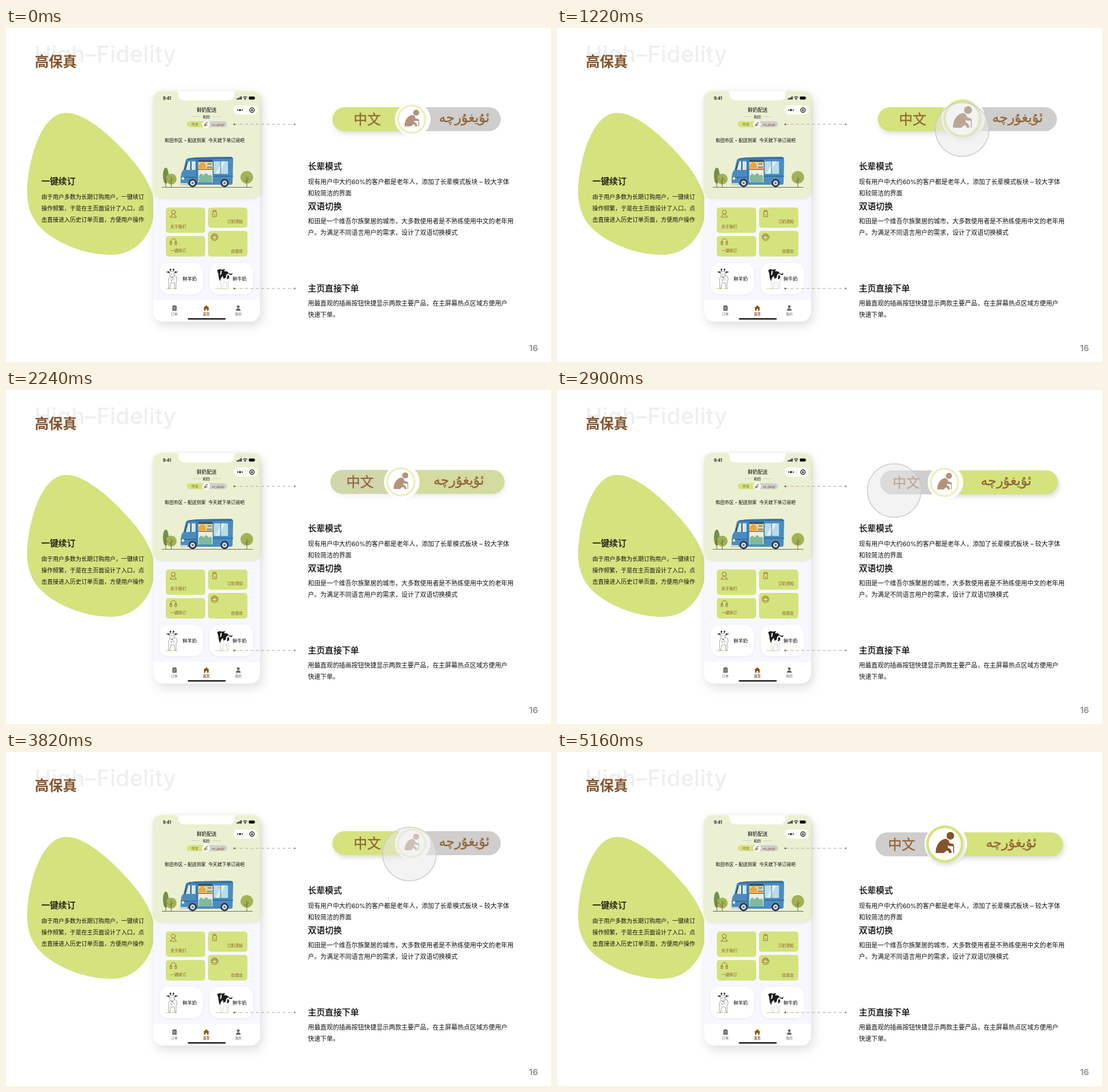
An HTML page that plays this animation: 955x586 px, repeating every 5330 ms.

```html
<!DOCTYPE html>
<html lang="zh-CN">
<head>
<meta charset="utf-8">
<title>高保真</title>
<style>
html, body { margin: 0; width: 100%; height: 100%; overflow: hidden; background: #fff; }
svg { display: block; width: 955px; height: 586px; font-family: Inter, "Noto Sans CJK SC", "Noto Sans CJK", "Noto Sans", sans-serif; }
text { white-space: pre; }
.latin { font-family: Inter, Roboto, sans-serif; }
.uy { font-family: "DejaVu Sans", sans-serif; direction: rtl; }
.h { font-size: 14.9px; font-weight: 500; fill: #000; stroke: #000; stroke-width: .25px; }
.p { font-size: 10.93px; fill: #111; }
.s { font-size: 10px; fill: #111; }
.mid { text-anchor: middle; }
.end { text-anchor: end; }
.label { font-size: 6.9px; fill: #84542c; }
.tab { font-size: 5.8px; fill: #666; text-anchor: middle; }
.line { fill: none; stroke: #84542c; stroke-width: .8; stroke-linecap: round; stroke-linejoin: round; }
#body { filter: drop-shadow(4px 7px 9px rgba(0,0,0,.13)); }
#hero { filter: drop-shadow(1px 2px 3px rgba(190,205,110,.45)); }
.card { fill: #fff; filter: drop-shadow(0 1px 2px rgba(90,100,150,.1)); }
#toggle { filter: blur(.45px); }
#toggle text { fill: #8c5a2c; fill-opacity: .9; text-anchor: middle; stroke: #8c5a2c; stroke-width: .4px; stroke-opacity: .8; }
</style>
</head>
<body>
<svg viewBox="0 0 955 586">
  <defs>
    <clipPath id="panel"><rect x="516" y="100" width="390" height="133"/></clipPath>
    <g id="arrow">
      <path d="M0 0H105" stroke="#b5a08e" stroke-width="1" stroke-dasharray="5 4.4"/>
      <circle r="1.5" fill="#84542c"/>
      <path d="M105 -2L108 0L105 2Z" fill="#9b7a5e"/>
    </g>
    <g id="elder" fill="#84542c">
      <circle cx="10.5" cy="-15.5" r="7.2"/>
      <path d="M-17 17V13C-16 1 -8 -9 1 -10C6 -10 8 -6 9 -2L16 0Q18 1 17 4L8 4L6 2V7Q13 9 13 17H8Q8 13 4 12L-2 17Z"/>
      <path d="M16.5 2V17" stroke="#84542c" stroke-width="1.7"/>
    </g>
    <g id="wheel">
      <circle r="7.2" fill="#26384b"/><circle r="4.4" fill="#d9dfe3"/><circle r="2" fill="#6c7983"/>
    </g>
    <path id="trunk" d="M0 0V18M0 7L4 3M0 10L-4 6" stroke="#7b6138" fill="none"/>
  </defs>

  <text class="latin" x="50" y="59.5" font-size="39" font-weight="500" fill="#efefef" letter-spacing=".5">High–Fidelity</text>
  <text x="50.5" y="67.8" font-size="24.5" font-weight="700" fill="#84542c">高保真</text>
  <text class="latin" x="916.5" y="567" font-size="14.8" font-weight="600" fill="#8b8b8b">16</text>

  <path fill="#d5e37e" d="M103 149C140 146 196 200 225 236C246 262 260 288 260 314C260 361 228 399 182 398C134 397 86 376 60 350C40 329 34 301 38 268C44 215 65 152 103 149Z"/>
  <text class="h" x="62" y="274">一键续订</text>
  <text class="s" x="62" y="300">由于用户多数为长期订购用户，一键续订</text>
  <text class="s" x="62" y="320">操作频繁，于是在主页面设计了入口，点</text>
  <text class="s" x="62" y="340">击直接进入历史订单页面，方便用户操作</text>

  <text class="h" x="529" y="248">长辈模式</text>
  <text class="p" x="529" y="273.8">现有用户中大约60%的客户都是老年人，添加了长辈模式板块 – 较大字体</text>
  <text class="p" x="529" y="293.8">和较简洁的界面</text>
  <text class="h" x="529" y="317.8">双语切换</text>
  <text class="p" x="529" y="343.2">和田是一个维吾尔族聚居的城市，大多数使用者是不熟练使用中文的老年用</text>
  <text class="p" x="529" y="363.2">户。为满足不同语言用户的需求，设计了双语切换模式</text>
  <text class="h" x="529" y="462">主页直接下单</text>
  <text class="p" x="529" y="487.2">用最直观的插画按钮快捷显示两款主要产品，在主屏幕热点区域方便用户</text>
  <text class="p" x="529" y="507.2">快速下单。</text>

  <g id="phone">
    <rect id="body" x="258" y="111" width="187" height="404" rx="17" fill="#f7f8ff"/>
    <rect id="hero" x="258" y="111" width="187" height="186" rx="14" fill="#ebf0d3"/>
    <path fill="#fff" d="M298 111H404Q400 111 400 116Q400 127 389 127H314Q302 127 302 116Q302 111 298 111Z"/>
    <text class="latin" x="275" y="126" font-size="7" font-weight="600">9:41</text>
    <path d="M404.8 125.5V123.7M407.2 125.5V122.7M409.6 125.5V121.5M412 125.5V120" stroke="#000" stroke-width="1.6"/>
    <path d="M415.4 121.8Q419 118.8 422.6 121.8M416.9 123.6Q419 121.8 421.1 123.6" fill="none" stroke="#000" stroke-width="1.1"/>
    <circle cx="419" cy="125" r=".9"/>
    <rect x="425.6" y="120.2" width="10" height="5.2" rx="1.4"/>
    <rect x="436" y="121.8" width=".8" height="2" fill="#555"/>
    <text class="mid" x="351.5" y="147.2" font-size="8.7" font-weight="500">鲜奶配送</text>
    <text class="mid" x="351" y="158" font-size="6">和田</text>
    <path d="M326 155.5H341M362 155.5H377" stroke="#b9bda7" stroke-width=".6"/>
    <rect x="399" y="136" width="42" height="16" rx="8" fill="#fff" fill-opacity=".85"/>
    <circle cx="410" cy="144" r="1.8"/><circle cx="406" cy="144" r="1"/><circle cx="414" cy="144" r="1"/>
    <path d="M420.5 140V148" stroke="#ddd" stroke-width=".6"/>
    <circle cx="431" cy="144" r="3.9" fill="none" stroke="#000" stroke-width="1.2"/><circle cx="431" cy="144" r="1.6"/>
    <path d="M322 163.5H350V174H322A5.2 5.2 0 0 1 322 163.5Z" fill="#d5e37e"/>
    <path d="M350 163.5H382A5.2 5.2 0 0 1 382 174H350Z" fill="#cfcfcd"/>
    <circle cx="350.5" cy="168.7" r="6.8" fill="#fff"/>
    <use href="#elder" transform="translate(350 169) scale(.2)" opacity=".65"/>
    <text class="mid" x="331" y="171" font-size="6" fill="#84542c">中文</text>
    <text class="mid uy" x="371.5" y="170.6" font-size="6" fill="#84542c">ئۇيغۇرچە</text>
    <text x="278" y="200" font-size="7.95">和田市区 – 配送到家  今天就下单订阅吧</text>

    <g id="scene">
      <ellipse cx="280" cy="259" rx="5" ry="14" fill="#75904a"/>
      <circle cx="289.5" cy="265" r="9.5" fill="#a0b355"/>
      <circle cx="422" cy="262" r="11" fill="#a0b355"/>
      <use href="#trunk" x="280" y="261"/><use href="#trunk" x="289.5" y="261"/><use href="#trunk" x="422" y="261"/>
      <path d="M273 279.5H432" stroke="#6d6a4f" stroke-width="1.2"/>
      <path d="M315 232Q318 228 325 228L334 227L394 226Q398 228 398 232L397 272Q397 275 393 275H310Q305 274 306 266L307 256Q308 251 311 249Z" fill="#4b8cc0"/>
      <path d="M315 232Q318 228 325 228L334 227L394 226Q398 227 398 230H334Z" fill="#3a719f"/>
      <path d="M318 234H332V249H313Z" fill="#cfe7ef"/>
      <path d="M312 249L317 234H319L315 249ZM323 234H325V249H323Z" fill="#35546f"/>
      <path d="M306 262H333M363 260H398" stroke="#316591" stroke-width="1.3"/>
      <path d="M334 230V275" stroke="#2d5f89"/>
      <rect x="337" y="231" width="25" height="19" fill="#f1d48c"/>
      <path d="M337 231H362V235H337Z" fill="#37546d"/>
      <path d="M338 240L344 234L350 240V246H338Z" fill="#e6a83f"/>
      <path d="M353 237H360V240H353ZM352 243H361V246H352Z" fill="#7ba0a0"/>
      <rect x="337" y="249" width="25" height="22" fill="#e9efe1"/>
      <path d="M338 260Q342 252 346 259Q351 251 355 259Q360 255 361 262V271H338Z" fill="#80b99b"/>
      <path d="M336 248H363" stroke="#b7793a" stroke-width="2"/>
      <rect x="364" y="234" width="25" height="22" rx="1" fill="#b8dde8"/>
      <path d="M367 256L378 234H384L373 256Z" fill="#dcf0f3"/>
      <path d="M376 234V256" stroke="#3a719f"/>
      <circle cx="310" cy="264" r="2.4" fill="#f6e7a8"/>
      <path d="M304 272H318V276H305Z" fill="#cfd6da"/>
      <use href="#wheel" x="327" y="272"/><use href="#wheel" x="383" y="272"/>
    </g>

    <g fill="#d5e37e">
      <rect x="280" y="315" width="69" height="44.5" rx="5"/><rect x="354" y="315" width="69" height="35.5" rx="5"/>
      <rect x="280" y="365" width="69" height="36" rx="5"/><rect x="354" y="356" width="69" height="45" rx="5"/>
    </g>
    <g class="line">
      <circle cx="293.2" cy="323" r="3.5"/><path d="M291.5 326V328Q288 329 287.7 332H298.7Q298 329 295 328V326"/>
      <path d="M363 320H368V322L369 325V331H362V325L363 322ZM363 322H368M364 326L367 329"/>
      <path d="M289 376V374A4.4 4.4 0 0 1 297.8 374V376M288 375H290.3V380H288ZM296.5 375H298.8V380H296.5Z"/>
      <circle cx="365.5" cy="367" r="6"/><path d="M362 365H369V370H362ZM361.5 365L363 363H368L369.5 365"/>
    </g>
    <text class="label" x="288" y="351">关于我们</text>
    <text class="label end" x="415" y="342">订奶须知</text>
    <text class="label" x="288" y="392.6">一键续订</text>
    <text class="label end" x="415" y="393.8">自提店</text>

    <rect class="card" x="269" y="412" width="76" height="55" rx="16"/>
    <rect class="card" x="357" y="412" width="76" height="55" rx="16"/>
    <text x="309.5" y="443" font-size="8.2">鲜羊奶</text>
    <text x="397" y="443" font-size="8.2">鲜牛奶</text>
    <path d="M279 457.5H300M367 457.5H388" stroke="#cdd6a0"/>
    <g id="goat" stroke="#444" stroke-width=".5" fill="#fff" stroke-linejoin="round">
      <path d="M287 436Q293 432 299 436Q301 441 298 446L298 457H296L295 447H289L287 457H285L285 446Q283 441 287 436Z"/>
      <path d="M286 429L289 427H293L296 429L294 436L291 439L288 436Z"/>
      <path d="M286 430L281 428L286 427ZM296 430L301 428L296 427ZM288 427Q285 421 290 423M293 427Q297 421 292 423" fill="#333"/>
      <path d="M288 440L290 444L292 440M293 439L295 443" fill="none"/>
      <path d="M289 431H290M293 431H294M290 437H292" stroke="#111" stroke-width="1.2"/>
    </g>
    <g id="cow" fill="#1c1c1c">
      <path d="M373 430Q383 426 391 430Q393 438 390 444L390 457H388L386 446H381L379 457H377L376 445Q372 438 373 430Z" fill="#fff" stroke="#999" stroke-width=".4"/>
      <path d="M370 425L374 423L378 424L384 423L382 427Q388 426 390 430L386 433L385 438L381 440L380 435L377 438L375 444L373 439L372 431Z"/>
      <path d="M388 434Q391 433 391 438Q389 442 387 440ZM390 430Q395 433 397 429L396 433Q393 434 390 431Z"/>
      <path d="M376 426L378 426L377.5 432L375 434Z" fill="#fff"/>
    </g>

    <path d="M258 477H445V498A17 17 0 0 1 428 515H275A17 17 0 0 1 258 498Z" fill="#fff"/>
    <path d="M291.5 487.5H293.5V486.5H297V487.5H299V496H291.5Z" fill="#666"/>
    <path d="M293.2 490.5H297.3M293.2 493H297.3" stroke="#fff" stroke-width=".7"/>
    <path d="M345.5 491.5L351 486.5L356.5 491.5H355V496H352.3V493H349.7V496H347V491.5Z" fill="#8a5a10"/>
    <circle cx="407" cy="489" r="2.4" fill="#666"/><path d="M402.8 496Q403 492 407 492Q411 492 411.2 496Z" fill="#666"/>
    <text class="tab" x="295" y="504.2">订单</text>
    <text class="tab" x="351" y="504.2" style="fill:#84542c;font-weight:700">首页</text>
    <text class="tab" x="407" y="504.2">我的</text>
    <path d="M319.5 510.3H384" stroke="#000" stroke-width="2.2" stroke-linecap="round"/>
  </g>

  <use href="#arrow" x="400" y="169"/>
  <use href="#arrow" x="400" y="457"/>

  <g clip-path="url(#panel)">
    <g id="toggle">
      <path id="left"/><path id="right"/>
      <circle id="gap" fill="#fff"/><circle id="disc" fill="#fff"/>
      <circle id="ring" fill="#fff" stroke="#d5e37e"/>
      <use id="person" href="#elder"/>
      <text id="zh" font-size="24" font-weight="500">中文</text>
      <text id="uy" class="uy" font-size="24">ئۇيغۇرچە</text>
    </g>
    <circle id="touch" r="47" fill="#e9e9e9" fill-opacity=".52" stroke="#cbcbcb" stroke-opacity=".85" stroke-width="1.8"/>
  </g>
</svg>
<script>
const LOOP = 5330;
const $ = id => document.getElementById(id);
const set = (id, attrs) => { for (const k in attrs) $(id).setAttribute(k, attrs[k]); };
const clamp = v => Math.min(1, Math.max(0, v));
const easeOut = p => 1 - (1 - p) ** 2;
const easeInOut = p => p * p * (3 - 2 * p);
const mix = (a, b, p) => a + (b - a) * p;

// x0/x1: pill ends, cx/cy: badge, r: ring radius, zh/uy: label centres, lang: 1 = second language, on: elder mode
const small   = { x0: 572, x1: 867, cx: 711, cy: 160, r: 24, zh: 633, uy: 803, lang: 0, on: 0 };
const large   = { x0: 560, x1: 878, cx: 710, cy: 158.5, r: 32.5, zh: 621, uy: 808, lang: 0, on: 1 };
const smallUy = { x0: 566, x1: 878, cx: 679, cy: 162, r: 24, zh: 612, uy: 787, lang: 1, on: 0 };
const largeUy = { x0: 558, x1: 887, cx: 679.5, cy: 161.5, r: 30.3, zh: 604, uy: 796, lang: 1, on: 1 };

const changes = [
  [370, 630, large], [1140, 1440, small], [2060, 2380, smallUy],
  [3030, 3330, small], [3950, 4200, large], [4780, 5150, largeUy]
];

// enter, arrive, leave, gone, x, y, x offset at the edge
const taps = [
  [90, 370, 390, 630, 710, 160, 0], [800, 1120, 1160, 1420, 710, 172, 0],
  [1720, 2000, 2030, 2240, 815, 170, 0], [2520, 3060, 3070, 3320, 593, 166, -23],
  [3615, 3895, 3940, 4210, 707, 171, 0], [4360, 4760, 4800, 5070, 803, 153, 0]
];
const EDGE = 285;

function stateAt(t) {
  let now = small;
  for (const [from, to, next] of changes) {
    if (t < from) break;
    const p = easeInOut(clamp((t - from) / (to - from))), prev = now;
    now = {};
    for (const k in next) now[k] = mix(prev[k], next[k], p);
  }
  return now;
}

const GREEN = [213, 227, 126], GREY = [207, 206, 205];
const tint = p => `rgb(${GREY.map((g, i) => Math.round(mix(g, GREEN[i], p)))})`;
const shadow = p => `filter:drop-shadow(2px 4px 4px rgba(0,0,0,${0.14 * p}))`;

function drawToggle(s) {
  const y = 139 + 2 * s.lang, b = y + 42;
  set("left", { d: `M${s.cx} ${y}H${s.x0 + 21}A21 21 0 0 0 ${s.x0 + 21} ${b}H${s.cx}Z`, fill: tint(1 - s.lang), style: shadow(1 - s.lang) });
  set("right", { d: `M${s.cx} ${y}H${s.x1 - 21}A21 21 0 0 1 ${s.x1 - 21} ${b}H${s.cx}Z`, fill: tint(s.lang), style: shadow(s.lang) });
  const r = s.r + 5.5;
  set("gap", { cx: s.cx + 3.5, cy: s.cy, r });
  set("disc", { cx: s.cx, cy: s.cy, r });
  set("ring", { cx: s.cx, cy: s.cy, r: s.r, "stroke-width": mix(3.6, 4.5, s.on), "stroke-opacity": mix(0.5, 1, s.on), style: shadow(s.on) });
  set("person", { transform: `translate(${s.cx} ${s.cy})scale(${s.r / 32.5})`, opacity: mix(0.62, 1, s.on) });
  set("zh", { x: s.zh, y: y + 30 });
  set("uy", { x: s.uy, y: y + 26 });
}

function drawTouch(t) {
  const tap = taps.find(([start, , , end]) => t >= start && t < end);
  $("touch").style.display = tap ? "" : "none";
  if (!tap) return;
  const [enter, arrive, leave, gone, x, y, dx] = tap;
  const away = t < leave
    ? 1 - easeOut(clamp((t - enter) / (arrive - enter)))
    : clamp((t - leave) / (gone - leave)) ** 2;
  set("touch", { cx: x + dx * away, cy: mix(y, EDGE, away) });
}

function frame() {
  const t = performance.now() % LOOP;
  drawToggle(stateAt(t));
  drawTouch(t);
  requestAnimationFrame(frame);
}
frame();
</script>
</body>
</html>
```
